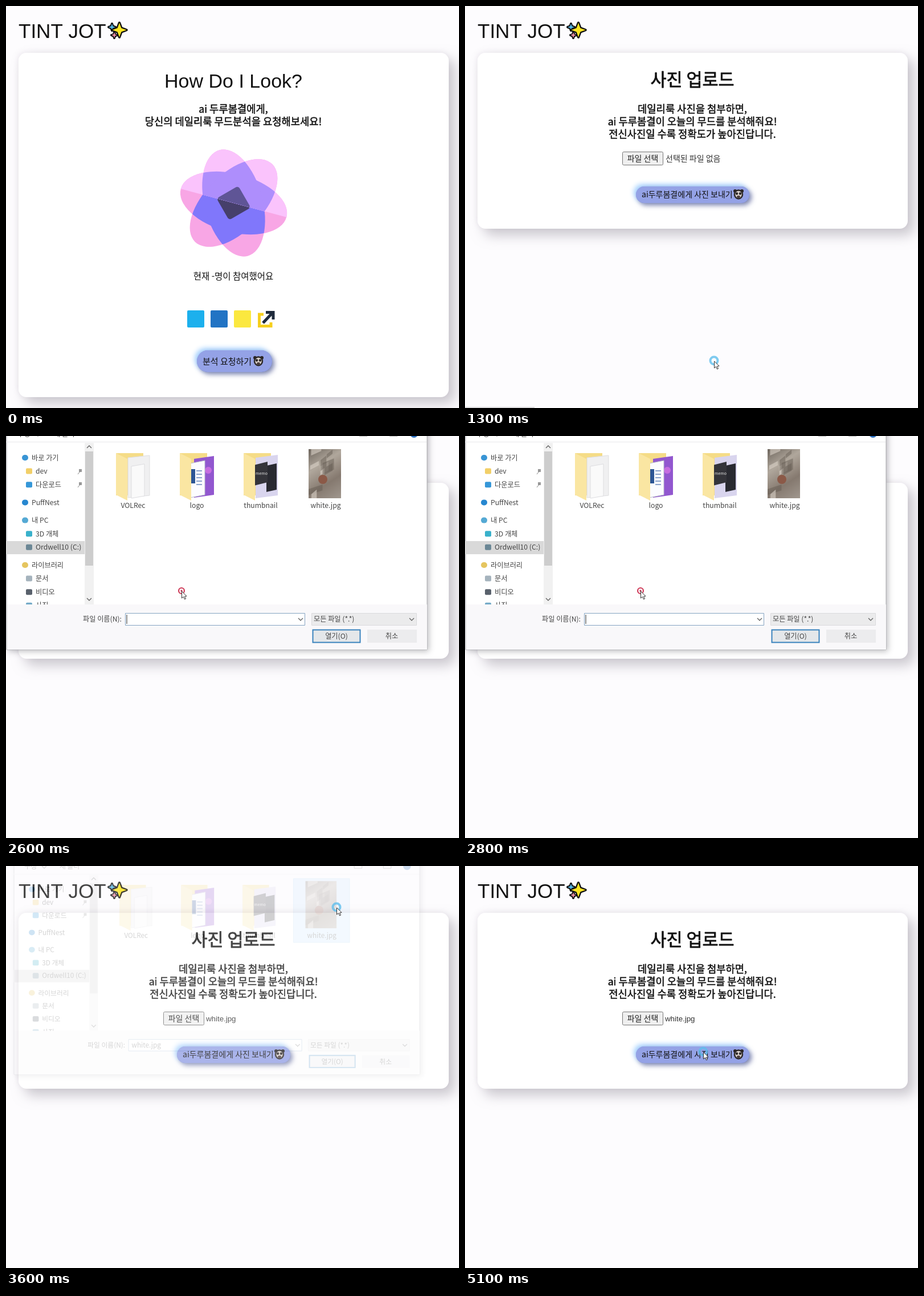
Write an HTML page with a canvas that moves like this. It is 795 by 704 pixels and loops after 5.2 s.

```html
<!DOCTYPE html>
<html lang="ko">
<head>
<meta charset="utf-8">
<style>
html, body { margin: 0; width: 100%; height: 100%; overflow: hidden; background: #fdfcfe; }
canvas { display: block; }
</style>
</head>
<body>
<canvas id="stage" width="795" height="704"></canvas>
<script>
const stage = document.getElementById('stage');
const screen = stage.getContext('2d');
const buffer = stage.cloneNode().getContext('2d');
let ctx = screen;

const LOOP = 5200, STEP = 100, MID = 399;
const KR = '"Noto Sans CJK KR", "Noto Sans CJK", sans-serif';
const LATIN = '"Liberation Sans", sans-serif';

// Places where the pointer rests; the ring turns blue from "click" on.
const stops = [
  { x: 513, y: 146, arrive: 0, leave: 100 },
  { x: 510, y: 660, arrive: 600, leave: 700 },
  { x: 437, y: 621, arrive: 1000, leave: 1600, click: 1000 },
  { x: 244, y: 266, arrive: 2000, leave: 2100 },
  { x: 308, y: 271, arrive: 2400, leave: 3000 },
  { x: 580, y: 72, arrive: 3300, leave: 4000, click: 3300 },
  { x: 418, y: 325, arrive: 4700, leave: LOOP, click: 5000 }
];

const clamp = v => Math.max(0, Math.min(1, v));
const ease = v => v * v * (3 - 2 * v);
const rad = deg => deg * Math.PI / 180;

function seeded(seed) {
  return () => (seed = seed * 16807 % 2147483647) / 2147483647;
}

function group(draw) { ctx.save(); draw(); ctx.restore(); }

function text(str, x, y, size, { font = KR, bold = 0, color = '#111', align = 'left' } = {}) {
  ctx.font = `${size}px ${font}`;
  ctx.fillStyle = ctx.strokeStyle = color;
  ctx.textAlign = align;
  ctx.fillText(str, x, y);
  if (bold) { ctx.lineWidth = bold; ctx.lineJoin = 'round'; ctx.strokeText(str, x, y); }
}

const label = (str, x, y, align = 'left') => text(str, x, y, 12.2, { color: '#444', align });

function paint(fill, stroke, line = 1) {
  if (fill) { ctx.fillStyle = fill; ctx.fill(); }
  if (stroke) { ctx.strokeStyle = stroke; ctx.lineWidth = line; ctx.stroke(); }
}

function rect(x, y, w, h, fill, r = 0, stroke, line) {
  ctx.beginPath();
  ctx.roundRect(x, y, w, h, r);
  paint(fill, stroke, line);
}

function oval(x, y, rx, ry, fill, stroke, line) {
  ctx.beginPath();
  ctx.ellipse(x, y, rx, ry, 0, 0, 7);
  paint(fill, stroke, line);
}

const circle = (x, y, r, ...style) => oval(x, y, r, r, ...style);

function line(shape, color, width) {
  ctx.lineCap = 'butt';
  ctx.stroke(new Path2D(shape), ctx.strokeStyle = color, ctx.lineWidth = width);
}

function shadowed(color, offset, blur, draw) {
  group(() => {
    ctx.shadowColor = color;
    ctx.shadowOffsetX = ctx.shadowOffsetY = offset;
    ctx.shadowBlur = blur;
    draw();
  });
}

function sparkle(x, y, r, fill, outline) {
  ctx.beginPath();
  for (let i = 0; i < 8; i++) {
    const d = i % 2 ? r * .38 : r, a = rad(45 * i);
    ctx.lineTo(x + Math.cos(a) * d, y + Math.sin(a) * d);
  }
  ctx.closePath();
  ctx.lineJoin = 'round';
  if (outline) paint(null, '#111', outline);
  paint(fill);
}

function header() {
  text('TINT JOT', 22, 56, 35, { font: LATIN });
  sparkle(186, 37, 6, '#55b9e8', 4);
  sparkle(190, 51, 5, '#ef8fa8', 4);
  sparkle(199, 42, 12.5, '#fbe622', 4.5);
}

function card(bottom) {
  const body = () => rect(22, 82, 755, bottom - 82, '#fff', 14);
  shadowed('rgba(225,220,228,.4)', -2, 8, body);
  shadowed('rgba(150,143,155,.5)', 11, 22, body);
}

function bear(x, y) {
  for (const side of [-1, 1]) circle(x + 6 * side, y - 6, 3, '#2a2626');
  oval(x, y, 7, 7.5, '#d9d0ca', '#2a2626', 2.4);
  for (const side of [-1, 1]) circle(x + 3 * side, y - 1.5, 2.2, '#2a2626');
  oval(x, y + 4, 3, 2, '#4a3d3d');
}

function pill(x, y, w, h, str, size, baseline) {
  const body = () => rect(x, y, w, h, '#94a2e6', h / 2);
  shadowed('#a9d4ff', -4, 9, body);
  shadowed('rgba(82,92,150,.75)', 4, 8, body);
  text(str, x + 10, baseline, size);
}

// Three crossed ellipses: single cover is petal, double cover is overlap.
function flowerLayer(petal, overlap, core) {
  const trace = i => {
    ctx.beginPath();
    ctx.ellipse(0, 0, 96, 51, rad(-75 - 60 * i), 0, 7);
  };
  for (let i = 0; i < 3; i++) { trace(i); paint(petal); }
  for (let i = 0; i < 3; i++) {
    group(() => { trace(i); ctx.clip(); trace(i + 1); paint(overlap); });
  }
  rect(-22, -22, 44, 44, core, 5);
}

function flower(t) {
  group(() => {
    ctx.translate(399.5, 345);
    ctx.rotate(rad(30 * t / 700 - 30));
    flowerLayer('#f8a6e5', '#8077fb', '#463f6b');
    ctx.clip(new Path2D('M-110-110L110 110V-110Z'));
    flowerLayer('#fac3fc', '#ae8efc', '#5f5596');
  });
}

function shareIcon() {
  line('M452 540H444.5V560.5H465V554', '#f6cf1d', 5);
  line('M451 555L468 537M456 536.5H469V549', '#1f2b3c', 5);
}

function paragraph(...lines) {
  lines.forEach((str, i) => text(str, MID, 187 + i * 22, 17.7, { bold: .5, align: 'center' }));
}

function homePage(t) {
  card(685);
  text('How Do I Look?', MID, 143, 34, { font: LATIN, align: 'center' });
  paragraph('ai 두루봄결에게,', '당신의 데일리룩 무드분석을 요청해보세요!');
  flower(t);
  text('현재 -명이 참여했어요', MID, 479, 15.5, { align: 'center' });
  ['#1cb0ed', '#2173c4', '#fbe83f'].forEach((c, i) => rect(318 + 41 * i, 533, 30, 30, c, 2));
  shareIcon();
  pill(335, 603, 132, 38, '분석 요청하기', 15, 628);
  bear(443, 622);
}

function uploadPage(t) {
  card(390);
  text('사진 업로드', MID, 140, 30.5, { bold: .8, align: 'center' });
  paragraph('데일리룩 사진을 첨부하면,', 'ai 두루봄결이 오늘의 무드를 분석해줘요!',
    '전신사진일 수록 정확도가 높아진답니다.');
  rect(276.5, 255.5, 71, 23, '#efefef', 2, '#767676');
  text('파일 선택', 312, 272, 14, { align: 'center', color: '#222' });
  if (t < 3500) text('선택된 파일 없음', 352, 272, 14, { color: '#333' });
  else text('white.jpg', 351, 272, 13.3, { font: LATIN, color: '#333' });
  pill(300, 316, 199, 29, 'ai두루봄결에게 사진 보내기', 14, 335);
  bear(480, 330);
  if (t < 1700) rect(0, 702, 122, 2, '#dcdbdd');
}

// Upright sheet seen at an angle; a positive slant raises the right edge.
function sheet(x, y, w, h, slant, fill, stroke) {
  ctx.beginPath();
  ctx.moveTo(x, y);
  ctx.lineTo(x + w, y - slant);
  ctx.lineTo(x + w, y + h - slant);
  ctx.lineTo(x, y + h);
  ctx.closePath();
  paint(fill, stroke);
}

function folder(x, name, contents) {
  rect(x, 30, 48, 74, '#f5dc87');
  group(() => { ctx.translate(x, 0); contents(); });
  sheet(x, 30, 20, 73, -10, '#fae6a2');
  label(name, x + 30, 126, 'center');
}

function papers() {
  sheet(21, 38, 38, 70, 4, '#f0f0f1', '#dedee0');
  sheet(27, 53, 23, 56, 4, '#fafafa', '#dddde0');
}

function artwork() {
  sheet(25, 40, 35, 68, 5, '#9257cf');
  circle(50, 60, 6, '#c66de0');
  sheet(13, 49, 31, 60, 6, '#fcfcff', '#b9bccb');
  rect(17, 58, 10, 25, '#2d5695');
  for (let y = 60; y < 88; y += 6) rect(29, y, 10, 2, '#8ba3cc');
}

function slides() {
  sheet(21, 38, 39, 71, 5, '#d9d5ee');
  sheet(40, 52, 18, 46, 4, '#292a31');
  sheet(18, 51, 24, 36, 6, '#34343a');
  text('memo', 21, 68, 7, { color: '#ddd' });
}

function photo(x, y, w, h) {
  const random = seeded(29);
  group(() => {
    ctx.beginPath();
    ctx.rect(x, y, w, h);
    ctx.clip();
    const tone = ctx.createLinearGradient(x, y, x + w, y + h);
    ['#6e665e', '#b0a79c', '#85796f', '#a0978e'].forEach((c, i) => tone.addColorStop(i / 3, c));
    rect(x, y, w, h, tone);
    for (let i = 0; i < 9; i++) {
      const fill = i % 2 ? 'rgba(218,210,200,.6)' : 'rgba(98,88,80,.45)';
      sheet(x + random() * w * .8, y + random() * h, 8 + random() * 18, 6 + random() * 14, 8, fill);
    }
    circle(x + 25, y + 53, 8, '#8b5947');
  });
}

function files(selected) {
  [['VOLRec', papers], ['logo', artwork], ['thumbnail', slides]]
    .forEach(([name, contents], i) => folder(193 + 112 * i, name, contents));
  if (selected) rect(509.5, 18.5, 102, 116, '#cce8ff', 0, '#a8d4f4');
  photo(531, 23, 57, 86);
  label('white.jpg', 561, 126, 'center');
}

const tree = [
  [['바로 가기', '#3995d5'], ['dev', '#f2cf68'], ['다운로드', '#3597d8']],
  [['PuffNest', '#2787d0']],
  [['내 PC', '#54a9d4'], ['3D 개체', '#39b1cb'], ['Ordwell10 (C:)', '#6b8795']],
  [['라이브러리', '#e5c55f'], ['문서', '#a5b3bd'], ['비디오', '#59616c'], ['사진', '#75abc8']]
];

function sidebar() {
  group(() => {
    ctx.beginPath();
    ctx.rect(0, 0, 138, 296);
    ctx.clip();
    rect(0, 184, 138, 23, '#d9d9d9');
    let y = 38;
    for (const branch of tree) {
      branch.forEach(([name, color], depth) => {
        const x = depth ? 52 : 45;
        rect(x - 17, y - 5, 11, 10, color, depth ? 2 : 5);
        label(name, x, y + 4.5);
        y += 23.6;
      });
      y += 7.6;
    }
  });
  for (const y of [62, 85]) {
    rect(128, y - 4, 5, 5, '#999');
    line(`M126 ${y + 5}l4-5`, '#888', 1);
  }
  rect(138, 12, 16, 283, '#f1f1f1');
  rect(139, 27, 14, 200, '#cdcdcd');
  chevron(146, 19, -1);
  chevron(146, 286);
}

function chevron(x, y, dir = 1) {
  line(`M${x - 4} ${y - 2 * dir}L${x} ${y + 2 * dir}L${x + 4} ${y - 2 * dir}`, '#666', 1.4);
}

function toolbar() {
  label('구성', 20, 1);
  chevron(56, -2);
  label('새 폴더', 84, 1);
  for (const x of [620, 673]) rect(x, -8, 14, 8, null, 0, '#777');
  circle(716, -4, 7, '#2b6fc0');
  rect(0, 10, 738, 1, '#e9e9ec');
}

function footer(selected) {
  rect(2, 295, 737, 79, '#f9f8fa');
  label('파일 이름(N):', 203, 325, 'right');
  rect(209.5, 310.5, 315, 21, '#fff', 0, '#86a5c2');
  if (selected) label('white.jpg', 215, 325);
  else rect(211.5, 313, 1, 16, '#222');
  rect(536.5, 310.5, 184, 21, '#ebebec', 0, '#dadadd');
  label('모든 파일 (*.*)', 540, 325);
  for (const x of [517, 712]) chevron(x, 321);
  rect(538.5, 339.5, 83, 22, '#e4e7ea', 0, '#3a83bd', 2);
  label('열기(O)', 580, 355, 'center');
  rect(634, 339, 87, 23, '#ececee');
  label('취소', 677, 355, 'center');
}

function dialog(selected) {
  shadowed('rgba(60,60,70,.35)', 3, 10, () => rect(1, -140, 738, 514, '#fff', 0));
  rect(1, -140, 738, 514, null, 0, '#a5a5a9');
  toolbar();
  sidebar();
  files(selected);
  footer(selected);
}

// The window is composed apart so that it fades as one layer.
function dialogLayer(t) {
  const opening = clamp((t - 2400) / 200), closing = clamp((t - 3400) / 255);
  const alpha = opening * (1 - closing);
  if (!alpha) return;
  ctx = buffer;
  ctx.clearRect(0, 0, stage.width, stage.height);
  group(() => {
    const scale = (.94 + .06 * ease(opening)) * (1 - .045 * closing);
    ctx.translate(370, 118);
    ctx.scale(scale, scale);
    ctx.translate(-370, -118);
    dialog(t >= 3300);
  });
  ctx = screen;
  group(() => {
    ctx.globalAlpha = alpha;
    ctx.drawImage(buffer.canvas, 0, 0);
  });
}

function cursor(t) {
  if (t < stops[0].leave) return;
  const i = stops.findIndex(stop => t <= stop.leave);
  const to = stops[i], from = stops[i - 1] || to;
  const k = i ? ease(clamp((t - from.leave) / (to.arrive - from.leave))) : 0;
  const x = from.x + (to.x - from.x) * k, y = from.y + (to.y - from.y) * k;
  if (t >= to.click) {
    circle(x, y, 6.5, null, 'rgba(95,190,236,.8)', 4);
  } else {
    circle(x, y, 5, 'rgba(255,235,240,.8)', '#cf3f5c', 2.2);
    circle(x, y, 1.5, '#b2314d');
  }
  group(() => {
    ctx.translate(x + .5, y + 1);
    const arrow = new Path2D('M0 0V12L3 9.5L5 14L7 13L5 9L8.5 8.5Z');
    ctx.fillStyle = '#fff';
    ctx.fill(arrow);
    line(arrow, '#333', 1);
  });
}

function render(t) {
  rect(0, 0, 795, 704, '#fdfcfe');
  if (t < 1200) homePage(t);
  else uploadPage(t);
  header();
  dialogLayer(t);
  cursor(t);
}

function line(shape, color, width) {
  ctx.lineCap = 'butt';
  ctx.lineJoin = 'miter';
  ctx.strokeStyle = color;
  ctx.lineWidth = width;
  ctx.stroke(new Path2D(shape));
}

const start = performance.now();
function tick() {
  const t = (performance.now() - start) % LOOP;
  render(Math.floor(t / STEP) * STEP);
  requestAnimationFrame(tick);
}
tick();
</script>
</body>
</html>
```
